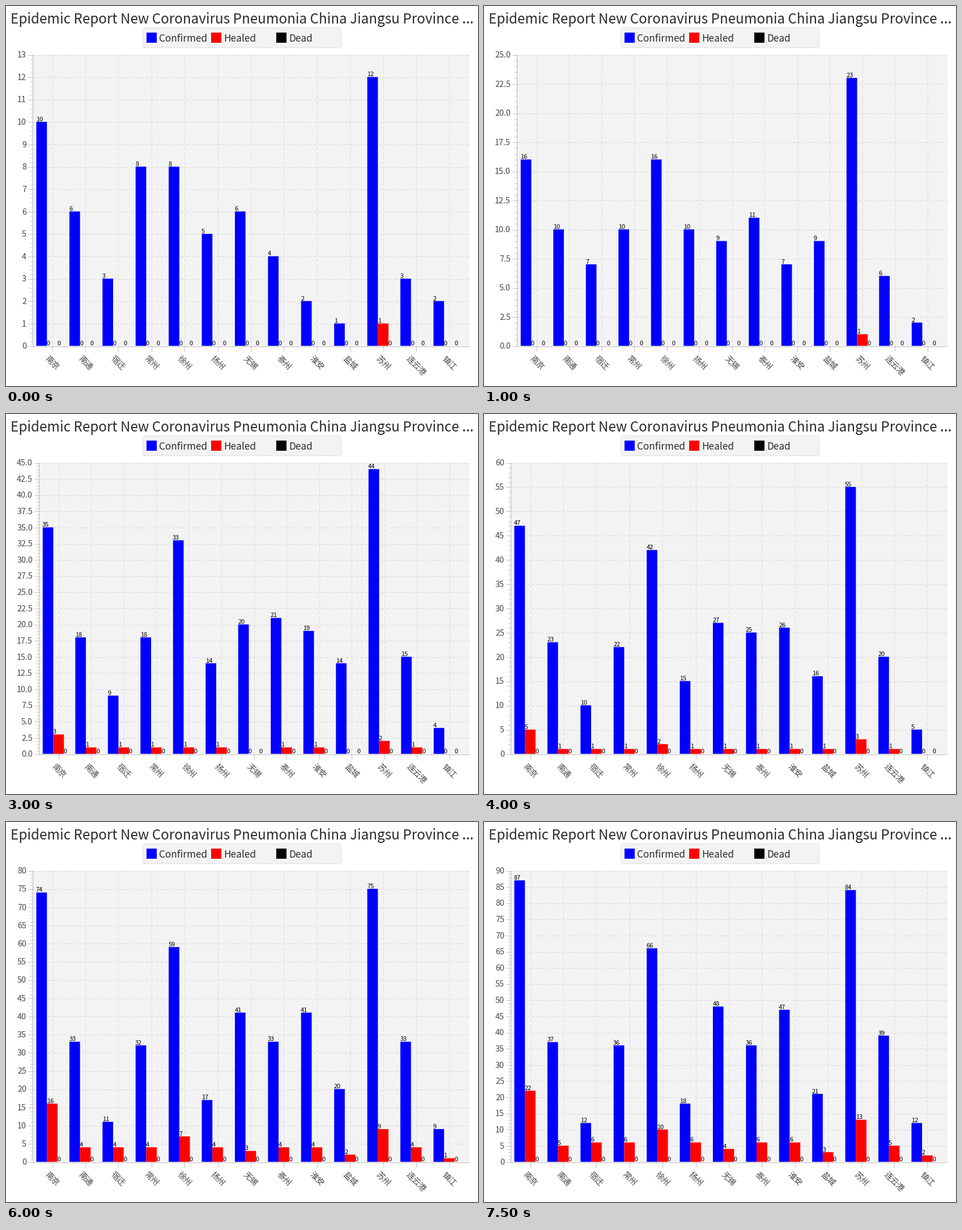
A matplotlib script that plays this animation: 833x672 px, repeating every 8 s.

```python
import math

import matplotlib.pyplot as plt
import numpy as np
from matplotlib.animation import FuncAnimation
from matplotlib.patches import FancyBboxPatch, Rectangle

W, H, DPI = 833, 672, 100
STEPS, STEP_MS = 16, 500
PX = 72 / DPI  # points per pixel
TOP, BOTTOM, RIGHT = 86, 601, 818
BAR = 18.7
FONT = "Noto Sans CJK JP"
TITLE = "Epidemic Report New Coronavirus Pneumonia China Jiangsu Province ..."
SERIES = [("Confirmed", "#0000ff", 248), ("Healed", "#ff0000", 362), ("Dead", "#000000", 477)]

# city: first count, last count, growth exponent, healed at the end
CITIES = {
    "南京": (10, 87, 1.35, 22), "南通": (6, 37, 1.1, 5), "宿迁": (3, 12, 0.45, 6),
    "常州": (8, 36, 1.3, 6), "徐州": (8, 66, 1, 10), "扬州": (5, 18, 0.48, 6),
    "无锡": (6, 48, 1.3, 4), "泰州": (4, 36, 0.8, 6), "淮安": (2, 47, 1.15, 6),
    "盐城": (1, 21, 0.5, 3), "苏州": (12, 84, 0.97, 13), "连云港": (3, 39, 1.35, 5),
    "镇江": (2, 12, 2.2, 2),
}

fig = plt.figure(figsize=(W / DPI, H / DPI), dpi=DPI, facecolor="white")
ax = fig.add_axes([0, 0, 1, 1])


def counts(step):
    """Confirmed, healed and dead per city; the spread slows after step 12."""
    p = np.interp(step, [0, 12, STEPS - 1], [0, 0.875, 1])
    rows = []
    for first, last, growth, healed in CITIES.values():
        confirmed = first + (last - first) * p ** growth
        recovered = max(first // 12, healed * p ** 2.6)
        rows.append((round(confirmed), round(recovered), 0))
    return rows


def axis_range(peak):
    """Tick unit and tick count that hold the peak plus 2% headroom."""
    unit = 1 if peak <= 12 else 2.5 if peak < 49 else 5
    return unit, math.ceil(peak * 1.02 / unit)


def text(x, y, s, size, color="#2c2c2c", **kw):
    ax.text(x, y, s, fontsize=size * PX, color=color, family=FONT, **kw)


def rect(x, y, w, h, color, z=1):
    ax.add_patch(Rectangle((x, y), w, h, fc=color, lw=0, zorder=z, snap=False))


def crisp(v):
    return math.floor(v) + 0.5


def hlines(ys, x0, x1, color, z, **kw):
    ax.hlines([crisp(y) for y in ys], x0, x1, color=color, lw=PX, zorder=z, **kw)


def vlines(xs, y0, y1, color, z, **kw):
    ax.vlines([crisp(x) for x in xs], y0, y1, color=color, lw=PX, zorder=z, **kw)


def draw_header():
    text(416.8, 30.8, TITLE, 24.25, ha="center", va="baseline")
    ax.add_patch(FancyBboxPatch((241.5, 38.5), 350, 35, fc="#f3f3f3", ec="#e0e0e0", lw=PX,
                                boxstyle="round,pad=0,rounding_size=4"))
    for name, color, x in SERIES:
        rect(x, 47, 18, 18, color, 2)
        text(x + 22.5, 63, name, 17.2, va="baseline")


def draw_axes(unit, count, left, centers):
    height = BOTTOM - TOP
    ticks = np.linspace(BOTTOM, TOP, count + 1)
    minor = np.linspace(BOTTOM, TOP, count * 5 + 1)
    dash = {"linestyles": [(0, (5.5, 3.5))]}

    rect(left, TOP, RIGHT - left, height, "#f3f3f3")
    vlines(centers, TOP, BOTTOM, "#dadada", 2, **dash)
    hlines(ticks, left, RIGHT, "#dadada", 2, **dash)

    hlines(minor, left - 5, left, "#cbcbcb", 4)
    hlines(ticks, left - 8, left, "#c0c0c0", 4)
    vlines(centers, BOTTOM + 1, BOTTOM + 10, "#c0c0c0", 4)
    vlines([left], TOP, BOTTOM + 1, "#b5b5b5", 5)
    hlines([BOTTOM], left, RIGHT, "#b5b5b5", 5)

    for k, y in enumerate(ticks):
        label = f"{k * unit:.1f}" if unit == 2.5 else str(k * unit)
        text(left - 11, y + 5.2, label, 14.4, "#484848", ha="right", va="baseline")
    for x, city in zip(centers, CITIES):
        text(x - 1, 616.6, city, 14.3, "#484848", rotation=-45, ha="center", va="top")


def draw(step):
    ax.clear()
    ax.set(xlim=(0, W), ylim=(H, 0))
    ax.axis("off")
    draw_header()

    rows = counts(step)
    unit, count = axis_range(max(row[0] for row in rows))
    # Decimal tick labels are wider and push the plot to the right
    left, first, pitch = (58, 93.3, 57.5) if unit == 2.5 else (47, 82, 58.41)
    centers = [first + pitch * i for i in range(len(CITIES))]
    draw_axes(unit, count, left, centers)

    scale = (BOTTOM - TOP) / (unit * count)
    for c, row in zip(centers, rows):
        for s, v in enumerate(row):
            x, y = c - 28.5 + s * BAR, BOTTOM - v * scale
            if v:
                rect(x, y, BAR, BOTTOM - y, SERIES[s][1], 3)
            text(x - 0.6, y - 1.2, v, 11, "black", va="baseline", zorder=6)


anim = FuncAnimation(fig, draw, frames=STEPS, interval=STEP_MS, init_func=lambda: None,
                     repeat=True, repeat_delay=0, blit=False)
plt.show()
```
